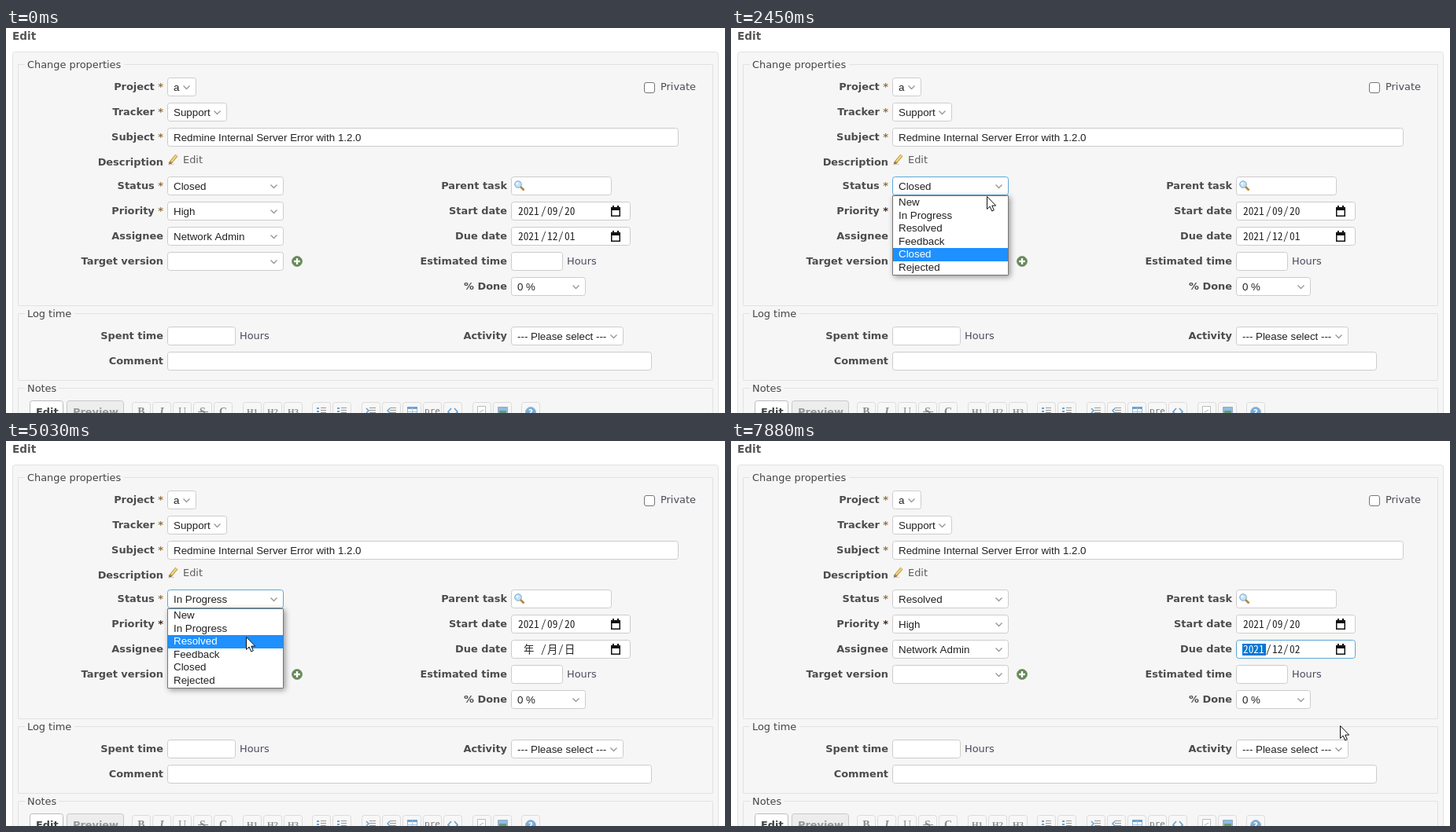
An HTML page with a canvas that plays this animation: 914x490 px, repeating every 8000 ms.

```html
<!DOCTYPE html>
<html lang="ja">
<head>
<meta charset="utf-8">
<title>Issue edit form</title>
<style>
html, body { margin: 0; width: 100%; height: 100%; overflow: hidden; background: #fff; }
canvas { display: block; }
</style>
</head>
<body>
<canvas id="stage" width="914" height="490"></canvas>
<script>
const ctx = document.getElementById('stage').getContext('2d');
const LOOP = 8000;
const UI = '12.9px "DejaVu Sans", sans-serif';
const BOLD = 'bold ' + UI;
const FIELD = '13.333px "Liberation Sans", Arial, sans-serif';
const DATE = '13.333px "Noto Sans Mono CJK JP", "Noto Sans CJK JP", monospace';
const CAL = '13px "Liberation Sans", "Noto Sans CJK JP", sans-serif';
const BLUE = '#0075ff', PANEL = '#f6f6f6', LABEL = '#4c4c4c', FOCUS = '#5ba7d6';

const STATUSES = ['New', 'In Progress', 'Resolved', 'Feedback', 'Closed', 'Rejected'];
const ROW = 16.5, LIST_TOP = 214;

// time, x, y of the pointer tip
const PATH = [
  [110, 795, 453], [330, 745, 350], [560, 692, 284], [660, 712, 275], [830, 724, 278],
  [1060, 703, 256], [1300, 560, 245], [1600, 393, 238], [1670, 380, 234], [2000, 332, 203],
  [2140, 328, 202], [2300, 327, 206], [2450, 325, 214], [2530, 325, 214], [2910, 308, 238],
  [3940, 308, 238], [4250, 330, 205], [4480, 330, 205], [4780, 307, 243], [4850, 305, 247],
  [5030, 305, 249], [5250, 305, 249], [5400, 330, 250], [5700, 560, 267], [5960, 758, 277],
  [6030, 771, 281], [6250, 771, 270], [6410, 771, 268], [6800, 771, 268], [7150, 772, 322],
  [7500, 774, 362], [LOOP, 774, 362]
];

function pointerAt(t) {
  const i = PATH.findIndex(p => p[0] > t);
  if (i < 1) return null;
  const [t0, x0, y0] = PATH[i - 1], [t1, x1, y1] = PATH[i];
  const k = (t - t0) / (t1 - t0);
  return { x: Math.round(x0 + (x1 - x0) * k), y: Math.round(y0 + (y1 - y0) * k) };
}

const within = (t, a, b) => t >= a && t < b;

function text(s, x, y, font, color = '#222', align = 'left') {
  ctx.font = font;
  ctx.fillStyle = color;
  ctx.textAlign = align;
  ctx.fillText(s, x, y);
}

function rect(x, y, w, h, color) {
  ctx.fillStyle = color;
  ctx.fillRect(x, y, w, h);
}

function box(x0, y0, x1, y1, radius = 3, border = '#cccccc', fill = '#fff') {
  ctx.beginPath();
  ctx.roundRect(x0 + .5, y0 + .5, x1 - x0 - 1, y1 - y0 - 1, radius);
  ctx.fillStyle = fill;
  ctx.fill();
  ctx.strokeStyle = border;
  ctx.lineWidth = 1;
  ctx.stroke();
}

function line(points, color, width = 1) {
  ctx.beginPath();
  points.forEach(([x, y]) => ctx.lineTo(x, y));
  ctx.strokeStyle = color;
  ctx.lineWidth = width;
  ctx.stroke();
}

function disc(x, y, r, fill, border) {
  ctx.beginPath();
  ctx.arc(x, y, r, 0, Math.PI * 2);
  ctx.fillStyle = fill;
  ctx.fill();
  if (border) {
    ctx.strokeStyle = border;
    ctx.lineWidth = 1;
    ctx.stroke();
  }
}

function input(x0, y, x1, value = '', border) {
  box(x0, y, x1, y + 24, 3, border);
  text(value, x0 + 8, y + 17, FIELD);
}

function select(x0, y, x1, value, border) {
  input(x0, y, x1, value, border);
  const x = x1 - 12.5, cy = y + 12.5;
  line([[x - 4, cy - 2], [x, cy + 2], [x + 4, cy - 2]], '#999', 1.4);
}

function label(s, right, y, star) {
  if (star) {
    text('*', right, y, BOLD, star, 'right');
    right -= ctx.measureText('* ').width;
  }
  text(s, right, y, BOLD, LABEL, 'right');
}

function fieldset(title, y0, y1, gapEnd) {
  box(15, y0, 899, y1, 0, '#e2e2e2', PANEL);
  rect(24, y0, gapEnd - 24, 1, PANEL);
  text(title, 27, y0 + 5, UI, '#444');
}

function dateField(y, parts, focused) {
  box(642, y, 794, y + 24, 3, focused ? FOCUS : undefined);
  if (focused) rect(650, y + 5, 30, 15, '#0078d7');
  const base = y + 17, blank = !parts;
  const [year, month, day] = parts || ['年', '月', '日'];
  text(year, blank ? 658 : 651, base, DATE, focused ? '#fff' : '#222');
  text('/', 680, base, DATE);
  text(month, 688, base, DATE);
  text('/', 702, base, DATE);
  text(day, 710, base, DATE);
  ctx.strokeStyle = '#111';
  ctx.lineWidth = 1.5;
  ctx.strokeRect(769.75, y + 7.75, 10.5, 10.5);
  rect(769, y + 7, 12, 4, '#111');
  rect(771, y + 5, 2, 3, '#111');
  rect(777, y + 5, 2, 3, '#111');
}

function fieldIcons() {
  line([[208, 173], [211, 169], [217, 162]], '#b58d45', 4);
  line([[210, 170], [217, 162]], '#f2d777', 2.4);
  line([[207, 174], [209, 172]], '#555', 1.5);
  line([[207, 173.5], [214, 173.5]], '#ccc');

  line([[654, 202], [658.5, 206.5]], '#b8863b', 2.6);
  disc(651, 199, 4.3, '#bfe3fa', '#7fa6c4');
  disc(650, 198, 1.6, '#eef9ff');

  disc(370, 297, 6.5, '#5f8a4e', '#8b9a86');
  line([[366, 297], [374, 297]], '#fff', 2.4);
  line([[370, 293], [370, 301]], '#fff', 2.4);
}

function bars(x, from = -6) {
  for (let y = 483.5; y < 491; y += 3) line([[x + from, y], [x + 6, y]], '#999');
}

function toolbar() {
  box(30, 474, 73, 496, 3, '#bbb');
  text('Edit', 38, 493, BOLD, '#444');
  box(77, 474, 150, 496, 3, '#c8c8c8', '#ededed');
  text('Preview', 85, 493, BOLD, '#999');

  const range = (start, n) => Array.from({ length: n }, (_, i) => start + 26 * i);
  [...range(172, 5), ...range(313, 3), ...range(401, 2), ...range(464, 5), ...range(605, 2), 667]
    .forEach(x => box(x - 12, 476, x + 12, 499, 3, '#dcdcdc', '#f7f7f7'));

  const serif = '14px "Liberation Serif", serif', gray = '#8c8c8c';
  ['bold ', 'italic bold ', '', 'bold ', 'bold '].forEach((style, i) =>
    text('BIUSC'[i], 172 + 26 * i, 493, style + serif, gray, 'center'));
  line([[244, 488.5], [257, 488.5]], gray);
  [1, 2, 3].forEach(n =>
    text('H' + n, 287 + 26 * n, 492, 'bold 11px "Liberation Serif", serif', gray, 'center'));

  const blue = '#6da3cf';
  [401, 427].forEach(x => {
    bars(x, -1);
    [484, 488].forEach(y => rect(x - 6, y - 1, 3, 2, blue));
  });
  [464, 490].forEach((x, i) => {
    bars(x, -2);
    const d = i ? -1 : 1;
    line([[x - 4 - 2 * d, 484], [x - 4 + d, 487], [x - 4 - 2 * d, 490]], blue, 1.5);
  });
  box(510, 482, 523, 496, 0, '#8fb4d3');
  rect(510, 482, 13, 3, blue);
  line([[516.5, 483], [516.5, 490]], '#a9c5dd');
  line([[510, 488.5], [523, 488.5]], '#a9c5dd');
  text('pre', 542, 491, '11px "DejaVu Sans Mono", monospace', '#777', 'center');
  line([[566, 484], [562, 488.5], [566, 493]], blue, 1.7);
  line([[570, 484], [574, 488.5], [570, 493]], blue, 1.7);
  box(599, 481, 610, 497, 0, '#bbb');
  line([[602, 489], [607, 486]], '#aaa');
  box(625, 482, 638, 496, 0, '#9aaabb', '#8dbce5');
  rect(627, 487, 9, 4, '#6b9b73');
  disc(667, 489, 6.5, '#79add8', '#9abbd5');
  text('?', 667, 493, 'bold 10px "DejaVu Sans", sans-serif', '#fff', 'center');
}

function shadowed(x0, y0, x1, y1, border) {
  ctx.save();
  ctx.shadowColor = 'rgba(0,0,0,.4)';
  ctx.shadowBlur = 7;
  ctx.shadowOffsetX = ctx.shadowOffsetY = 2;
  rect(x0, y0, x1 - x0, y1 - y0, '#fff');
  ctx.restore();
  box(x0, y0, x1, y1, 0, border);
}

function statusList(active) {
  shadowed(205, 213, 353, 315, '#767676');
  STATUSES.forEach((name, i) => {
    const y = LIST_TOP + i * ROW, on = i === active;
    if (on) rect(206, Math.round(y), 146, 17, '#1e90ff');
    text(name, 213, Math.round(y + 12.2), FIELD, on ? '#fff' : '#222');
  });
}

function calendar(pointer) {
  shadowed(642, 278, 860, 510, '#bdbdbd');
  text('2021年(令和3年) 12', 711, 302, 'bold ' + CAL, '#111', 'center');
  text('月', 705, 322, 'bold ' + CAL, '#111', 'center');
  ctx.beginPath();
  ctx.moveTo(715, 316);
  ctx.lineTo(723, 316);
  ctx.lineTo(719, 320);
  ctx.fill();
  [[803, 1, '#24964a'], [835, -1, '#28754a']].forEach(([x, d, color]) => {
    line([[x, 301 - 8 * d], [x, 301 + 8 * d]], color, 1.4);
    line([[x - 7, 301 - d], [x, 301 - 8 * d], [x + 7, 301 - d]], color, 1.4);
  });
  [...'日月火水木金土'].forEach((name, i) =>
    text(name, 667 + 28 * i, 341, CAL, i === 0 ? '#bf5b10' : i === 6 ? '#1769c4' : '#222', 'center'));

  for (let i = 0; i < 35; i++) {
    const x = 667 + 28 * (i % 7), y = 365 + 28 * Math.floor(i / 7);
    const n = i - 2, day = n < 1 ? n + 30 : n > 31 ? n - 31 : n;
    const chosen = n === 1;
    const hover = Math.abs(pointer.x - x) < 14 && Math.abs(pointer.y - y) < 14;
    if (chosen) {
      box(x - 14, y - 14, x + 14, y + 14, 2, '#111', BLUE);
      ctx.lineWidth = 2;
      ctx.strokeRect(x - 13, y - 13, 26, 26);
    } else if (hover) {
      box(x - 14, y - 14, x + 14, y + 14, 2, '#e6e6e6', '#e6e6e6');
    }
    const color = chosen ? '#fff' : n < 1 ? '#6a9a80' : n > 31 ? '#5b8f9c' : '#111';
    text(day, x, y + 5, (chosen ? 'bold ' : '') + CAL, color, 'center');
  }
}

function drawPointer({ x, y }) {
  ctx.beginPath();
  [[0, 0], [0, 16], [3.6, 12.6], [6.2, 18.5], [8.8, 17.4], [6.3, 11.6], [11.2, 11.6]]
    .forEach(([dx, dy]) => ctx.lineTo(x + .5 + dx, y + .5 + dy));
  ctx.closePath();
  ctx.fillStyle = '#fff';
  ctx.fill();
  ctx.strokeStyle = '#111';
  ctx.lineWidth = 1;
  ctx.stroke();
}

function form(t) {
  rect(0, 0, 914, 490, '#fff');
  text('Edit', 8, 14.5, 'bold 13.6px "DejaVu Sans", sans-serif', '#555');
  box(8, 30, 906, 510, 3, '#e2e2e2', PANEL);
  fieldset('Change properties', 46, 354, 150);
  fieldset('Log time', 363, 449, 87);
  fieldset('Notes', 458, 520, 67);

  const star = '#94703f';
  label('Project', 200, 79, star);
  label('Tracker', 200, 111, star);
  label('Subject', 200, 143, star);
  label('Description', 200, 175);
  label('Status', 200, 205, star);
  label('Priority', 200, 237, t < 2070 ? star : '#3c2418');
  label('Assignee', 200, 269);
  label('Target version', 200, 301);
  label('Spent time', 200, 396);
  label('Comment', 200, 428);
  ['Parent task', 'Start date', 'Due date', 'Estimated time', '% Done']
    .forEach((s, i) => label(s, 637, 205 + 32 * i));
  label('Activity', 637, 396);

  text('Private', 832, 79, UI, '#4a4a55');
  box(811, 69, 825, 83, 2.5, '#767676');
  text('Edit', 225, 172, UI, '#5c5c5c');
  text('Hours', 713, 301, UI, '#4a4a60');
  text('Hours', 297, 396, UI, '#4a4a60');

  const status = t < 3610 ? 'Closed' : t < 5320 ? 'In Progress' : 'Resolved';
  const statusFocus = within(t, 2000, 3690) || within(t, 4330, 5390);
  select(205, 63, 242, 'a');
  select(205, 95, 281, 'Support');
  input(205, 127, 855, 'Redmine Internal Server Error with 1.2.0');
  select(205, 189, 353, status, statusFocus ? FOCUS : undefined);
  select(205, 221, 353, 'High');
  select(205, 253, 353, 'Network Admin');
  select(205, 285, 353, '');
  input(642, 189, 770);
  dateField(221, ['2021', '09', '20']);
  const due = t < 3690 ? ['2021', '12', '01'] : t < 7880 ? null : ['2021', '12', '02'];
  dateField(253, due, t >= 6330);
  input(642, 285, 708);
  select(642, 317, 737, '0 %');
  input(205, 380, 292);
  select(642, 380, 785, '--- Please select ---');
  input(205, 412, 821);
  fieldIcons();
  toolbar();
}

function draw(t) {
  const pointer = pointerAt(t);
  form(t);
  if (within(t, 2070, 3540) || within(t, 4400, 5250)) {
    const current = t < 3540 ? 4 : 1;
    statusList(pointer.y > LIST_TOP + 1 ? Math.floor((pointer.y - LIST_TOP) / ROW) : current);
  }
  if (within(t, 6570, 7820)) calendar(pointer);
  if (pointer) drawPointer(pointer);
}

const start = performance.now();
function tick() {
  draw((performance.now() - start) % LOOP);
  requestAnimationFrame(tick);
}
tick();
</script>
</body>
</html>
```
